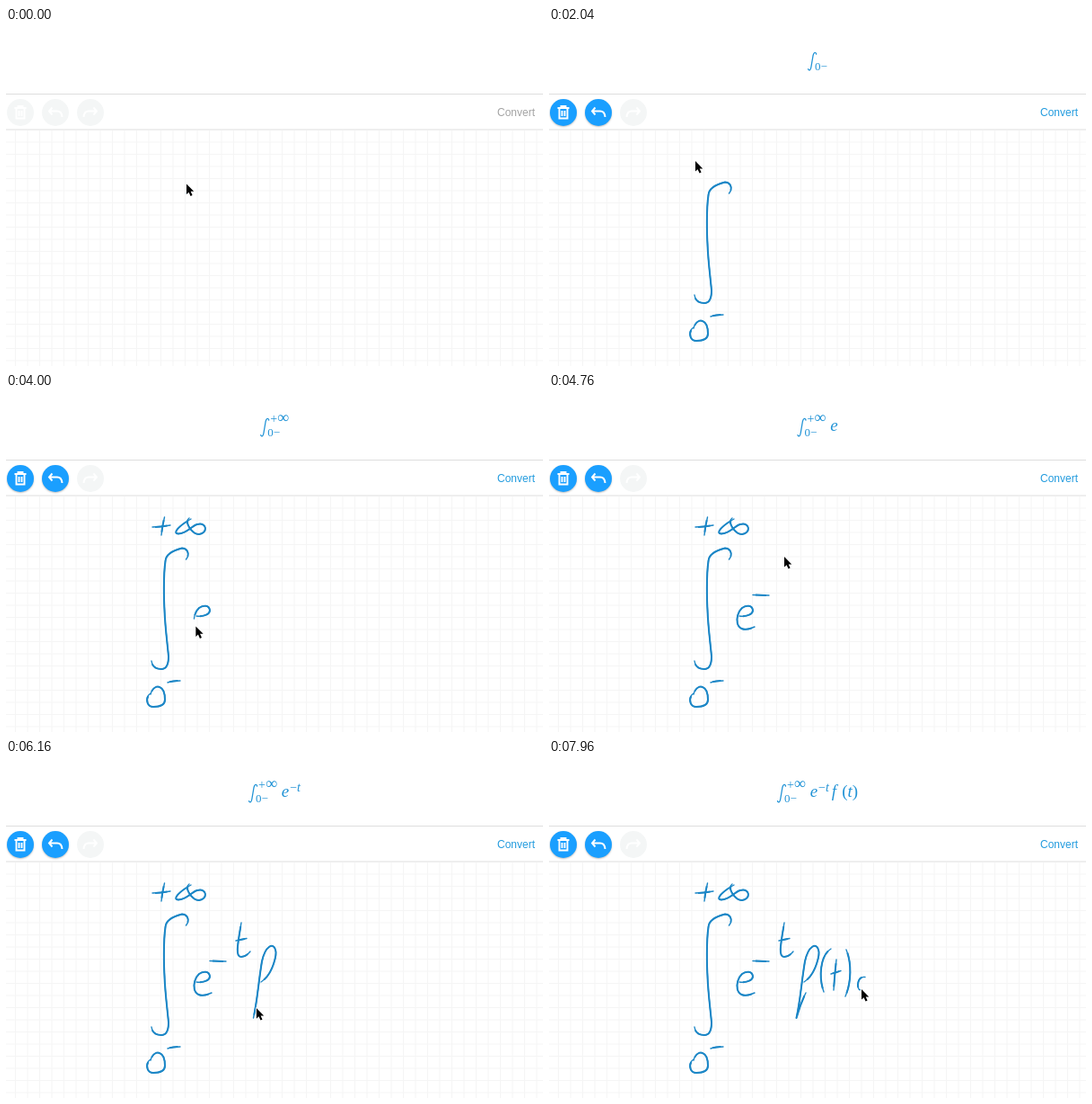
An HTML page with a canvas for the animation above (8 s loop, 598x376 px).

```html
<!DOCTYPE html>
<html lang="en">
<head>
<meta charset="utf-8">
<title>Handwritten formula</title>
<style>
  html, body { margin: 0; width: 100%; height: 100%; overflow: hidden; background: #fff; }
  canvas { display: block; width: 598px; height: 376px; }
  svg { position: absolute; width: 0; height: 0; }
</style>
</head>
<body>
<canvas id="stage"></canvas>
<svg><path id="curve"/></svg>
<script>
const W = 598, H = 376, LOOP = 8000;
const INK_LAG = 40, RECOGNITION = 220, GRID = 13.5;
const INK = '#1b86c6', MATH = '#2193d6', BLUE = [26, 159, 255];
const canvas = document.getElementById('stage');
const ctx = canvas.getContext('2d');
const curve = document.getElementById('curve');
const dpr = window.devicePixelRatio || 1;
canvas.width = W * dpr;
canvas.height = H * dpr;

const clamp = v => Math.max(0, Math.min(1, v));
const ease = v => v * v * (3 - 2 * v);
const mix = (a, b, k) => a + (b - a) * k;
const blend = (a, b, k) => `rgb(${a.map((v, i) => Math.round(mix(v, b[i], k))).join(',')})`;

// One pen stroke, and the formula part it turns into once recognised.
// Drawing time follows from the length of the curve.
function pen(start, part, text, d) {
  const shape = curve.cloneNode();
  shape.setAttribute('d', d);
  const len = shape.getTotalLength();
  return { start, end: start + 100 + 3 * len, part, text, len, shape, path: new Path2D(d) };
}

const strokes = [
  pen(-40, 'sign', '∫', 'M200.5 184C204 180 204 172 196 171.5Q178 176 177.5 186C175 203 176 232 176.5 240C177 258 180 280 181 292Q181 306 173 306Q163 306 162 297'),
  pen(860, 'low', '0', 'M161 333C155 337 156 348 164 348Q177 348 177 340C177 322 164 322 161 334'),
  pen(1500, 'low', '0−', 'M180 321Q185 319 194 319'),
  pen(2060, 'high', '−', 'M163 148Q172 148 183 146'),
  pen(2400, 'high', '+', 'M176.5 137Q174 147 173 157'),
  pen(2880, 'high', '+∞', 'M204 138C198 142 207 156 215 156C225 155 224 142 213 145C206 147 202 155 192 155.5C184 155 195 145 206 139'),
  pen(3760, 'base', 'e', 'M212 247C218 248 227 246 227 240.5C226 234 219 235 215 238C206 246 206 270 229 259'),
  pen(4480, 'exp', '−', 'M227 223.5L245 224'),
  pen(4800, 'exp', '−L', 'M262 181C258 205 255 219 262 219Q267 219 272 213'),
  pen(5230, 'exp', '−t', 'M256 201L268 198.5'),
  pen(5640, 'fn', 'f', 'M284 247C297 239 302 216 300 211C298 203 289 206 285 224C281 248 280 267 275.5 287Q280 271 286 259'),
  pen(6400, 'arg', '(', 'M314 210C302 217 300 242 306 258'),
  pen(6820, 'arg', '(l', 'M320 222Q318 240 317 256'),
  pen(7080, 'arg', '(t', 'M314 238L325 234.5'),
  pen(7270, 'arg', '(t)', 'M331 211C337 225 337 247 330 263'),
  pen(7770, 'arg', '(t)', 'M352 241.5C341 240 343 260 348 255')
];

function line(x1, y1, x2, y2) {
  ctx.beginPath();
  ctx.moveTo(x1, y1);
  ctx.lineTo(x2, y2);
  ctx.stroke();
}

function drawPaper() {
  ctx.fillStyle = '#fff';
  ctx.fillRect(0, 0, W, H);
  ctx.lineWidth = 1;
  ctx.strokeStyle = '#f5f5f5';
  for (let x = 10.5; x < W; x += GRID) line(x, 114, x, H);
  for (let y = 127; y < H; y += GRID) line(0, y, W, y);
  ctx.strokeStyle = '#dedede';
  line(0, 73.5, W, 73.5);
  line(0, 113, W, 113);
}

function button(x, on, icon, flip = 1) {
  ctx.save();
  ctx.translate(x, 94);
  ctx.shadowColor = `rgba(0,0,0,${0.25 * on})`;
  ctx.shadowBlur = 2 * dpr;
  ctx.shadowOffsetY = dpr;
  ctx.fillStyle = blend([244, 246, 246], BLUE, on);
  ctx.beginPath();
  ctx.arc(0, 0, 15, 0, 7);
  ctx.fill();
  ctx.shadowColor = 'transparent';
  ctx.scale(flip, 1);
  ctx.strokeStyle = '#fff';
  ctx.lineWidth = 1.9;
  ctx.stroke(new Path2D(icon));
  ctx.restore();
}

function drawToolbar(t) {
  const on = clamp((t - 820) / 160);
  const bin = 'M-6.5 -5H6.5M-2.5 -5V-7H2.5V-5M-4.5 -5V6.5H4.5V-5M-1.5 -2V4M1.5 -2V4';
  const arrow = 'M-3.5 -5.5L-7 -1.5L-3.5 2.5M-7 -1.5H2Q7 -1.5 7.5 5';
  button(16, on, bin);
  button(55, on, arrow);
  button(94, 0, arrow, -1);
  ctx.fillStyle = blend([163, 163, 163], [34, 155, 222], on);
  ctx.font = '12px "Liberation Sans", Arial, sans-serif';
  ctx.fillText('Convert', 547, 98);
}

// Places each sign after the one before and returns the right edge.
function typeset(out, text, x, y, size, italic) {
  for (const sign of text) {
    const em = sign === '∞' ? size + 4 : size;
    const slant = italic && /[a-zL]/.test(sign) ? 'italic ' : '';
    const font = `${slant}${em}px "Liberation Serif", serif`;
    ctx.font = font;
    out.push({ sign, x, y, font });
    x += ctx.measureText(sign).width;
  }
  return x;
}

function drawFormula(t) {
  const f = { sign: '', low: '', high: '', base: '', exp: '', fn: '', arg: '' };
  for (const s of strokes) if (t >= s.end + RECOGNITION) f[s.part] = s.text;
  if (!f.sign) return;
  const out = [];
  let x = Math.max(10, typeset(out, f.low, 8, 46.5, 13), typeset(out, f.high, 11, 32, 14));
  if (f.base) x = typeset(out, f.base, x + 5, 41, 19, true);
  if (f.exp) x = typeset(out, f.exp, x + 1, 34.5, 14, true);
  if (f.fn) x = typeset(out, f.fn, x + 3, 41, 19, true);
  if (f.arg) x = typeset(out, f.arg, x + 6, 41, 19, true);
  ctx.save();
  ctx.translate(299 - x / 2, 0);
  ctx.fillStyle = ctx.strokeStyle = MATH;
  ctx.lineCap = 'round';
  ctx.lineWidth = 1.3;
  ctx.stroke(new Path2D('M9.6 29C9 26.5 6.8 26.6 6 30.5L3.8 43.5C3.2 47.3 1.3 47.8 .6 45.6'));
  for (const g of out) {
    ctx.font = g.font;
    ctx.fillText(g.sign, g.x, g.y);
  }
  ctx.restore();
}

const progress = (s, t) => s.len * clamp((t - s.start) / (s.end - s.start));

// A thin line under a thicker middle gives the pen its tapered ends.
function drawInk(s, t) {
  const shown = progress(s, t - INK_LAG);
  if (t < s.start + INK_LAG) return;
  const taper = Math.min(4, s.len / 6);
  ctx.save();
  ctx.strokeStyle = INK;
  ctx.lineCap = ctx.lineJoin = 'round';
  ctx.lineWidth = 1.4;
  ctx.setLineDash([shown, 2 * s.len]);
  ctx.stroke(s.path);
  if (shown > 2 * taper) {
    ctx.lineWidth = 2;
    ctx.setLineDash([0, taper, shown - 2 * taper, 2 * s.len]);
    ctx.lineCap = 'butt';
    ctx.stroke(s.path);
  }
  ctx.restore();
}

function cursorAt(t) {
  const i = strokes.filter(s => s.start <= t).length - 1;
  const s = strokes[i], next = strokes[i + 1];
  const from = s.shape.getPointAtLength(progress(s, t));
  if (t <= s.end || !next) return from;
  const to = next.shape.getPointAtLength(0);
  const k = ease(clamp((t - s.end) / (next.start - 50 - s.end)));
  return { x: mix(from.x, to.x, k), y: mix(from.y, to.y, k) };
}

function drawCursor(t) {
  const { x, y } = cursorAt(t);
  const arrow = new Path2D('M0 0V11.6L2.6 9.2L4.6 13.5L6.6 12.6L4.7 8.4H8.3Z');
  ctx.save();
  ctx.translate(x, y);
  ctx.lineJoin = 'round';
  ctx.lineWidth = 1.6;
  ctx.strokeStyle = '#fff';
  ctx.stroke(arrow);
  ctx.fillStyle = '#000';
  ctx.fill(arrow);
  ctx.restore();
}

function draw(t) {
  ctx.setTransform(dpr, 0, 0, dpr, 0, 0);
  drawPaper();
  drawToolbar(t);
  drawFormula(t);
  strokes.forEach(s => drawInk(s, t));
  drawCursor(t);
}

const began = performance.now();
function tick() {
  draw((performance.now() - began) % LOOP);
  requestAnimationFrame(tick);
}
tick();
</script>
</body>
</html>
```
